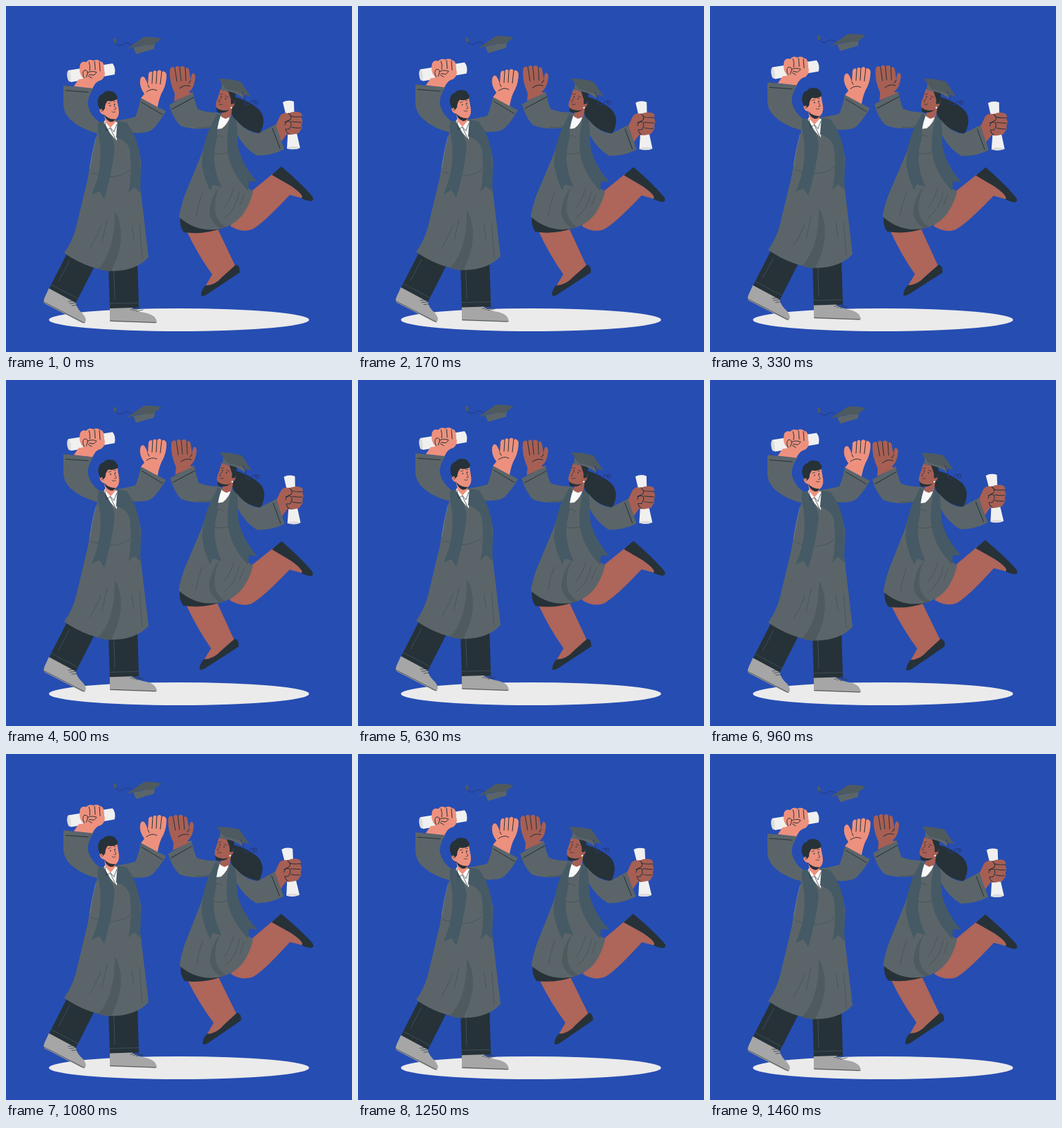
Animation, 500 px wide and 500 px high, one loop 1.5 s. Source, as an HTML page:

```html
<!DOCTYPE html>
<html lang="en">
<head>
<meta charset="utf-8">
<title>Graduation high five</title>
<style>
  html, body { margin: 0; width: 100%; height: 100%; overflow: hidden; background: #264db2; }
  svg { display: block; width: 100%; height: 100%; }
  .robe { fill: #5b6569; }
  .fold { fill: #4f5a5f; }
  .stole { fill: #455a64; }
  .dark { fill: #263238; }
  .shoe { fill: #a6a6a6; }
  .paper { fill: #f0f0f0; }
  .shade { fill: #dcdcdc; }
  .white { fill: #fafafa; }
  .peach { fill: #ed917e; }
  .brown { fill: #a75f54; }
  .leg { fill: #ae655a; }
  .line { fill: none; stroke: #263238; stroke-width: 1; stroke-linecap: round; stroke-linejoin: round; }
  .thin { stroke-width: .7; }
  .seam { stroke: #455a64; }
  .crease { stroke: #465156; stroke-width: .8; }
  .cord { stroke: #26397a; }
</style>
</head>
<body>
<svg viewBox="0 0 500 500">
  <rect width="500" height="500" fill="#264db2"/>
  <ellipse cx="250" cy="453.5" rx="188" ry="16.600" fill="#ebebeb"/>

  <g id="man">
    <!-- flying cap -->
    <path class="line cord" d="M182 56Q174 51 169 56Q162 60 157.500 52"/>
    <path class="fold" d="M155 47L159 47L160 53L156 54Z"/>
    <path class="robe" d="M184 60L188 69.500L214 62L215 54Z"/>
    <path class="fold" d="M173 63L199 45Q212 44 225 47L213 56Q191 56 173 63Z"/>

    <!-- legs -->
    <path class="dark" d="M88 358L62 409L101 429L130 372Z"/>
    <path class="dark" d="M148 372L150 438L192 436L190 370Z"/>
    <path class="line thin seam" d="M66 403L104 423M150 430L191 429M92 368L76 398M156 382L157 424"/>
    <path class="shoe" d="M62 408L101 429Q102 437 111 445Q118 453 114 458Q112 459 108 457L56 430Q53 428 56 421Z"/>
    <path class="line thin" d="M55 428L113 458M90 427L99 426M92 430L101 429M95 433L103 432"/>
    <path class="shoe" d="M150 437L182 436Q188 441 204 444Q216 447 218 456Q217 459 211 458L150 456Z"/>
    <path class="line thin" d="M151 455L217 457.500M180 439L190 435M184 440L194 437M188 441L198 439"/>

    <!-- gown -->
    <path class="robe" d="M83 115L126 119Q118 132 118 142Q121 158 135 168L163 165Q177 163 187 160Q192 148 195 133L231 152Q222 168 212 178Q205 185 180 183Q192 200 195 224L194 262L206 363Q189 382 155 383Q119 381 84 357Q96 340 101 321L118 250Q124 212 132 184Q108 178 93 164Q83 154 83 142Z"/>
    <path class="fold" d="M157 297Q164 305 166 325Q168 352 152 383Q143 384 133 380Q158 354 157 297Z"/>
    <path class="line crease" d="M123 241Q160 254 179 237M137 318Q133 331 121 351M146 309L139 341M193 316L197 365M182 318L185 339M185 183Q177 181 174 176"/>
    <path class="line thin" stroke-opacity=".45" style="stroke:#b4bbc2" d="M130 190Q124 212 121 235"/>
    <path class="line" d="M86 122L119 124.500M196 139L226 157"/>

    <!-- shirt and stole -->
    <path class="white" d="M143 165L140 172L160 195L162 168Z"/>
    <path class="stole" d="M134 168Q131 175 134 187Q140 218 132 250L124 273L135 268L142 279Q153 242 157 207Q157 192 141 168Z"/>
    <path class="stole" d="M161 166L174 168Q188 185 193 212Q195 240 194 270L185 262L177 270Q183 239 179 209Q176 195 159 190Z"/>
    <path class="peach" d="M142 157L157 157L158 168L151 176L144 168Z"/>
    <path class="line thin" d="M143 168L145 180L151 176L156 182L160 171M151 177L159 194"/>

    <!-- head -->
    <g id="head">
      <path class="peach" d="M141 138Q147 131 160 134L163 150Q164 160 158 164Q148 167 142 157Q137 157 135 151Q135 145 140 147Z"/>
      <path class="dark" d="M136 150Q131 142 133 134Q135 128 140 127Q143 122 150 123Q156 123 158 127Q162 130 160 135Q153 139 147 137Q143 141 143 148L140 152Q138 146 136 150Z"/>
      <path class="dark" d="M142 157Q148 164 158 163.500Q156 168 151 167.500Q144 165 142 157Z"/>
      <path class="line thin" d="M147 141L151 140M155 138.500L158 138M156 143L159 149L156 150M153 153Q156 154.500 158 153M137 150L139 153"/>
      <circle class="dark" cx="150.500" cy="144" r=".9"/>
      <circle class="dark" cx="157" cy="142" r=".9"/>
    </g>

    <!-- fist with scroll -->
    <path class="paper" d="M90 93L154 83Q159 89 157 99L94 110Q86 104 90 93Z"/>
    <ellipse class="shade" cx="91" cy="101.500" rx="2.600" ry="8" transform="rotate(-7 91 101.500)"/>
    <path class="peach" d="M98 116L105 106L112 105Q104 97 107 85Q109 79 116 81Q120 76 126 79Q132 76 136 80Q142 80 142 93Q145 101 138 107Q130 108 125 119Z"/>
    <path class="line" d="M120 81Q122 86 121 93M128 80L129 92M135 81L136 94M113 104Q109 97 113 93Q118 92 118 97L116 103M118 96Q125 93 131 96L127 100L120 99M119 101L124 104"/>

    <!-- open hand -->
    <path class="peach" d="M195 133L200 127Q192 116 194 106Q196 100 200 103Q203 107 205 114L206 98Q208 93 212 96Q214 91 218 95Q222 90 225 95Q230 93 232 99Q232 112 227 122Q222 130 219 146Z"/>
    <path class="line" d="M205 114L207 118M212 96L211 112M218 95L217 112M225 95L223 113M203 124Q211 118 218 122"/>
  </g>

  <g id="woman">
    <!-- legs -->
    <path class="leg" d="M261 325Q277 359 298 388L288 405Q310 402 332 377L305 320Z"/>
    <path class="dark" d="M282 419Q281 412 288 404Q302 404 313 391L332 374Q338 374 338 385L290 417Q285 420 282 419Z"/>
    <path class="leg" d="M324 318Q340 328 355 323Q370 316 410 273L429 278Q433 274 412 260L386 242L352 270Z"/>
    <path class="dark" d="M384 244L398 232Q424 254 441 273Q447 280 441 282Q436 282 427 278Q432 274 412 260Z"/>
    <path class="dark" d="M252 304Q250 318 257 327Q286 331 312 321Z"/>

    <!-- hair -->
    <path class="dark" d="M327 130Q352 137 365 149Q378 162 367 184Q348 181 335 169Q322 155 325 141Z"/>

    <!-- gown -->
    <path class="robe" d="M236 143L270 124Q273 139 277 149Q289 154 305 154L333 165Q348 183 365 184L390 171L402 207Q382 217 362 216Q346 207 334 186Q334 212 343 228L350 254L350 263L357 268Q354 283 344 299Q331 317 309 322Q276 328 250 305Q252 292 258 274L283 213Q288 194 296 176Q270 180 252 173Q241 162 236 143Z"/>
    <path class="fold" d="M309 261Q301 276 302 296Q304 311 317 319L311 322Q296 314 294 300Q295 276 309 261Z"/>
    <path class="line crease" d="M298 212Q310 216 321 212M303 187Q309 186 314 190M284 270Q277 288 275 304M337 269Q333 293 316 306M329 264Q324 281 315 292M344 272L338 288M297 174Q286 177 276 176"/>
    <path class="line" d="M240 149L271 132M385 177L396 206"/>
    <path class="white" d="M309 159L324 158Q322 169 312 177L304 178Z"/>
    <path class="stole" d="M305 155L310 159Q304 176 305 191Q294 227 312 262L299 258L295 267Q286 249 283 228Q285 193 297 171Z"/>
    <path class="stole" d="M325 158L333 165Q335 180 334 196Q338 226 363 254L351 253L350 267Q325 242 320 210Q318 185 325 158Z"/>

    <!-- head -->
    <path class="brown" d="M313 145L327 146L325 160L317 163L311 160Z"/>
    <path class="brown" d="M310 120L328 126Q332 134 330 143Q325 152 316 153Q305 151 303 144Q303 139 306 133Z"/>
    <path class="dark" d="M321 123L332 126L330 141L325 142L325 135Z"/>
    <path class="dark" d="M304 147L305 153L308 154Q317 155 323 150Q312 153 304 147Z"/>
    <path class="line thin" d="M309 128L313 127M317 130L321 132M311 133L307 138L309 139M308 142Q310 144 313 142"/>
    <circle class="dark" cx="311" cy="131" r=".9"/>
    <circle class="dark" cx="317" cy="134" r=".9"/>
    <circle class="white" cx="325.500" cy="147" r="1.200"/>
    <path class="robe" d="M312 112L311 122Q328 122 343 133L347 124Z"/>
    <path class="fold" d="M307 105Q323 105 339 109L354 131Q334 123 318 120Z"/>
    <path class="line cord" d="M341 124Q346 132 345 141Q351 146 355 138Q358 135 361 139"/>
    <circle class="line cord" cx="361.500" cy="139" r="2.500"/>

    <!-- open hand -->
    <path class="brown" d="M243 138L244 127Q235 108 237 91Q240 86 244 90Q247 84 251 89Q256 84 259 90Q264 87 265 95L267 108Q267 100 270 97Q275 98 273 107Q272 118 264 125L269 126Z"/>
    <path class="line" d="M244 90L247 109M251 89L253 108M259 90L260 108M267 108L264 112M251 119Q258 113 266 116"/>

    <!-- fist with scroll -->
    <path class="paper" d="M400 139Q407 135 416 138L417 170L425 205Q416 209 406 206L408 172Z"/>
    <ellipse class="shade" cx="415.500" cy="205" rx="8.500" ry="2"/>
    <path class="brown" d="M390 172L396 159Q400 153 408 155Q418 151 425 154Q429 156 427 162Q430 166 427 172Q429 177 425 180Q424 185 417 185Q410 187 406 185L398 196Z"/>
    <path class="line" d="M411 159Q418 161 427 160M413 167Q420 168 427 168M413 175Q419 177 426 176M408 155Q414 159 411 164L403 168M403 172Q404 165 411 167Q414 172 409 178L404 178Q405 183 409 185"/>
  </g>
</svg>
<script>
  const LOOP = 1500, PEAK = 660, LIFT = 9, SWAY = 0.87;
  const man = document.getElementById("man");
  const head = document.getElementById("head");
  const woman = document.getElementById("woman");
  const ease = p => (1 - Math.cos(Math.PI * p)) / 2;

  function draw(now) {
    const t = now % LOOP;
    const rise = t < PEAK ? ease(t / PEAK) : 1 - ease((t - PEAK) / (LOOP - PEAK));
    const angle = SWAY * Math.sin(2 * Math.PI * t / LOOP);
    man.setAttribute("transform", `translate(0 ${-LIFT * rise})`);
    head.setAttribute("transform", `rotate(${2 * rise} 150 168)`);
    woman.setAttribute("transform", `rotate(${angle} 325 258)`);
  }

  const start = performance.now();
  function tick() {
    draw(performance.now() - start);
    requestAnimationFrame(tick);
  }
  tick();
</script>
</body>
</html>
```
